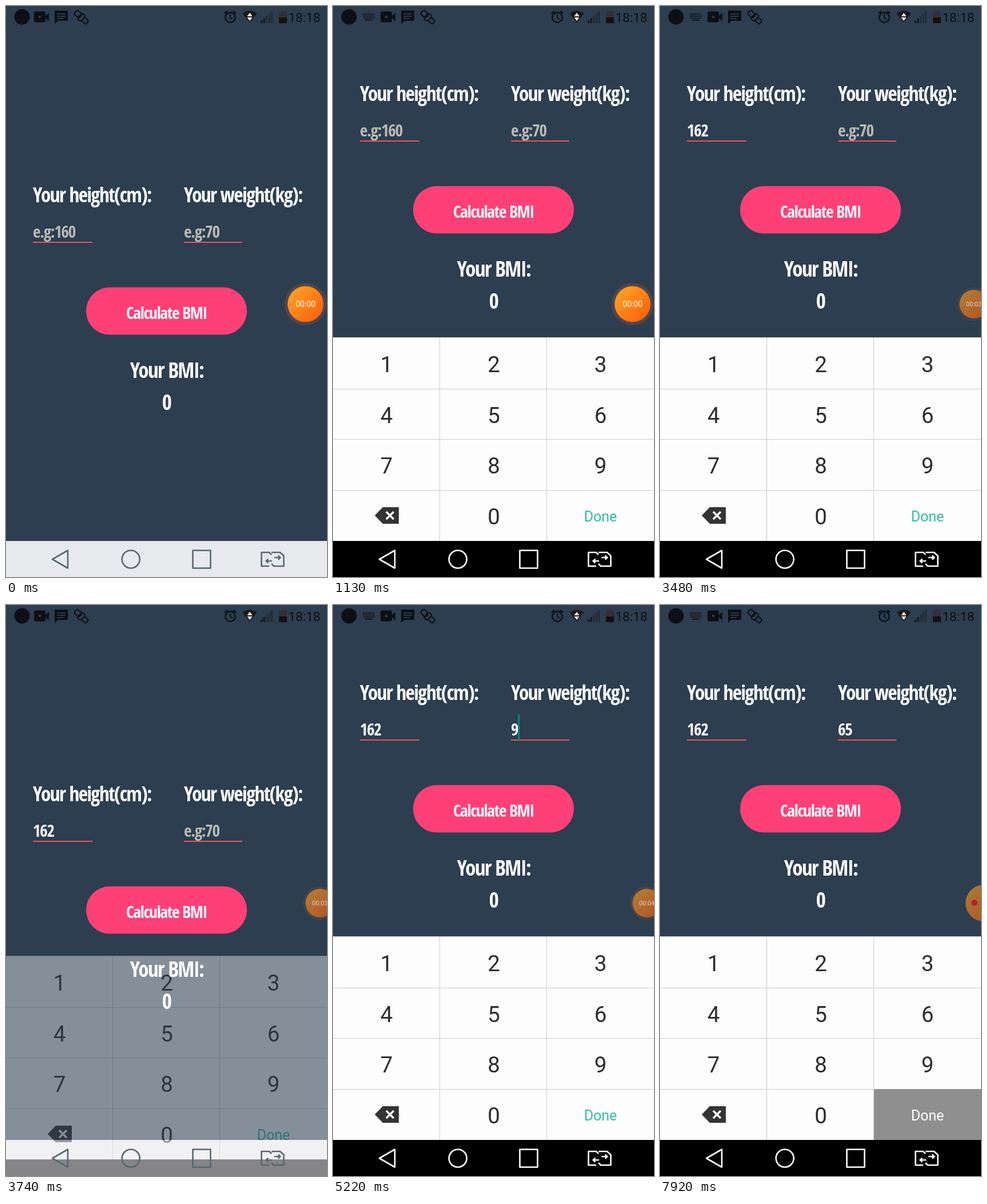
An HTML page with a canvas that plays this animation: 561x998 px, repeating every 8 s.

```html
<!DOCTYPE html>
<html lang="en">
<head>
<meta charset="utf-8">
<title>BMI calculator</title>
<style>
html, body { margin: 0; width: 100%; height: 100%; overflow: hidden; background: #2c3e4f; }
canvas { display: block; width: 561px; height: 998px; }
</style>
</head>
<body>
<canvas id="stage" width="561" height="998"></canvas>
<script>
const W = 561, H = 998, LOOP = 8000;
const screen2d = document.getElementById('stage').getContext('2d');
const layer = document.createElement('canvas');
layer.width = W;
layer.height = H;
const layer2d = layer.getContext('2d');
let ctx = screen2d;

const BG = '#2c3e4f', PINK = '#ff4077', INK = '#0c1015';
const ROBOTO = 'Roboto, "Noto Sans", sans-serif';
const KB_TOP = 579, NAV_TOP = 935, SHIFT = 177;
const ROWS = [579, 669, 757, 846, 935], COLS = [0, 187, 374, 561];
const KEYS = ['1', '2', '3', '4', '5', '6', '7', '8', '9', 'Del', '0', 'Done'];

// timeline: [start, value]
const HEIGHT = [[0, ''], [2090, '1'], [2350, '16'], [2700, '162']];
const WEIGHT = [[0, ''], [5130, '9'], [6000, ''], [6700, '6'], [6960, '65']];
const FOCUS = [[0, ''], [520, 'h'], [3310, ''], [4090, 'w'], [7920, '']];
const CLOCK = [[0, '00:00'], [1390, '00:01'], [2350, '00:02'], [3390, '00:03'], [4530, '00:04'], [5390, '']];
// presses: [start, end, key]
const PRESSES = [[2260, 2350, '6'], [2610, 2700, '2'], [3130, 3310, 'Done'], [4960, 5130, '9'],
  [5920, 6090, 'Del'], [6700, 6790, '6'], [6960, 7050, '5'], [7920, 8000, 'Done']];

const clamp = v => Math.max(0, Math.min(1, v));
const mix = (a, b, u) => a + (b - a) * u;
const entry = (list, t) => list.filter(e => e[0] <= t).pop();
const at = (list, t) => entry(list, t)[1];

function rect(x, y, w, h, color) {
  ctx.fillStyle = color;
  ctx.fillRect(x, y, w, h);
}
function round(x, y, w, h, r, color) {
  ctx.fillStyle = color;
  ctx.beginPath();
  ctx.roundRect(x, y, w, h, r);
  ctx.fill();
}
function disc(x, y, r, color) {
  ctx.fillStyle = color;
  ctx.beginPath();
  ctx.arc(x, y, r, 0, 7);
  ctx.fill();
}
function trace(points, close) {
  ctx.beginPath();
  points.forEach(p => ctx.lineTo(p[0], p[1]));
  if (close) ctx.closePath();
}
function poly(points, color) {
  trace(points, true);
  ctx.fillStyle = color;
  ctx.fill();
}
function line(points, color, width, close) {
  trace(points, close);
  ctx.strokeStyle = color;
  ctx.lineWidth = width;
  ctx.stroke();
}
function text(s, x, y, font, color, align = 'left') {
  ctx.font = font;
  ctx.fillStyle = color;
  ctx.textAlign = align;
  ctx.fillText(s, x, y);
}

// the installed family with the tallest capitals for its width
function slimmest(families) {
  const slimness = name => {
    ctx.font = `400 extra-condensed 100px ${name}, sans-serif`;
    return ctx.measureText('H').actualBoundingBoxAscent / ctx.measureText('Your height(cm):').width;
  };
  return families.reduce((a, b) => slimness(b) > slimness(a) ? b : a);
}
const NARROW = slimmest(['Oswald', '"Open Sans"', 'Roboto', '"Roboto Condensed"', '"Open Sans Condensed"',
  '"Noto Sans"', '"Noto Sans ExtraCondensed"', '"Liberation Sans Narrow"', '"DejaVu Sans Condensed"',
  'Lato', '"Liberation Sans"', '"Noto Sans CJK JP"']);
const TRACKING = -0.045;

// largest font size whose capitals stay within cap and whose sample stays within width
function face(weight, cap, sample, width) {
  const make = size => `${weight} extra-condensed ${size}px ${NARROW}, sans-serif`;
  ctx.font = make(100);
  const perCap = 100 / ctx.measureText('H').actualBoundingBoxAscent;
  const perWidth = 1 / (ctx.measureText(sample).width / 100 + TRACKING * sample.length);
  const size = Math.min(cap * perCap, width * perWidth);
  return { font: make(size), tracking: `${size * TRACKING}px` };
}
function label(s, x, y, style, color, align) {
  ctx.letterSpacing = style.tracking;
  text(s, x, y, style.font, color, align);
  const width = ctx.measureText(s).width;
  ctx.letterSpacing = '0px';
  return width;
}
const LABEL = face(400, 27, 'Your height(cm):', 207);
const INPUT = face(400, 22, 'e.g:160', 74);
const BUTTON = face(400, 22, 'Calculate BMI', 141);
const TITLE = face(700, 27, 'Your BMI:', 134);

function keyboardState(t) {
  const show = s => {
    const u = clamp((t - s) / 260);
    return { lifted: true, dy: Math.round(83 * (1 - u) ** 2), alpha: 0.5 + 0.5 * u };
  };
  if (t >= 4440) return show(4440);
  if (t >= 3570) {
    const u = clamp((t - 3570) / 350);
    return { lifted: false, dy: Math.round(144 * u * u), alpha: Math.max(0, 1 - 1.17 * u) };
  }
  if (t >= 870) return show(870);
  return { lifted: false, dy: 0, alpha: 0 };
}

function field(x, width, list, hint, id, t) {
  const [since, value] = entry(list, t);
  const length = label(value || hint, x, 405, INPUT, value ? '#fff' : '#b9bab6');
  rect(x, 412, width, 2, '#ea5560');
  const [focused, who] = entry(FOCUS, t);
  if (who === id && (t - Math.max(focused, since)) % 1000 < 440)
    rect(x + (value ? length : 0), 368, 3, 45, '#0d857a');
}

function form(t, lifted) {
  ctx.save();
  if (lifted) ctx.translate(0, -SHIFT);
  label('Your height(cm):', 47, 342.5, LABEL, '#fff');
  label('Your weight(kg):', 311, 342.5, LABEL, '#fff');
  field(47, 104, HEIGHT, 'e.g:160', 'h', t);
  field(311, 102, WEIGHT, 'e.g:70', 'w', t);
  round(140, 491.8, 281, 82.7, 41, PINK);
  label('Calculate BMI', 280.5, 547, BUTTON, '#fff', 'center');
  label('Your BMI:', 281, 650, TITLE, '#fff', 'center');
  label('0', 280.5, 706, TITLE, '#fff', 'center');
  ctx.restore();
}

function statusLeft(lifted) {
  disc(28, 19, 13.5, INK);
  ctx.save();
  if (lifted) {
    for (let r = 0; r < 3; r++)
      for (let i = 0; i < 7; i++) rect(52 + i * 3 + r * 0.5, 13 + r * 3.5, 2, 2, INK);
    rect(56, 23.5, 13, 2, INK);
    ctx.translate(34, 0);
  }
  round(49, 9.5, 20, 19, 3, INK);
  poly([[67, 19], [75, 12], [75, 27]], INK);
  disc(59, 19, 2.2, BG);
  poly([[85, 8], [108, 8], [108, 26], [91, 26], [85, 31]], INK);
  [13, 17, 21].forEach((y, i) => rect(89, y, i === 2 ? 11 : 15, 1.8, BG));
  ctx.translate(131, 19);
  ctx.rotate(0.75);
  ctx.strokeStyle = INK;
  ctx.lineWidth = 2;
  ctx.beginPath();
  ctx.roundRect(-13, -4.5, 12, 9, 3);
  ctx.roundRect(-3, -6.5, 8, 13, 3);
  ctx.roundRect(5, -4, 10, 8, 3);
  ctx.stroke();
  ctx.restore();
}

function statusRight() {
  ctx.strokeStyle = INK;
  ctx.lineWidth = 2.4;
  ctx.beginPath();
  ctx.arc(392, 20, 8.8, 0, 7);
  ctx.stroke();
  line([[392, 14], [392, 20.5], [396, 23]], INK, 2);
  line([[382, 13], [387, 9]], INK, 2.5);
  line([[402, 13], [397, 9]], INK, 2.5);

  ctx.fillStyle = '#1d1815';
  ctx.beginPath();
  ctx.moveTo(426, 29);
  ctx.lineTo(413.5, 13);
  ctx.quadraticCurveTo(426, 4, 438.5, 13);
  ctx.fill();
  poly([[426, 12], [430.5, 18], [421.5, 18]], '#fff');
  poly([[426, 26], [430.5, 20], [421.5, 20]], '#fff');

  for (let i = 0; i < 5; i++)
    rect(445 + i * 4.5, 25 - i * 4, 3.2, 5 + i * 4, i < 2 ? '#151a20' : '#242d37');
  rect(481, 8, 6, 3, '#332f36');
  rect(477, 10, 14, 10, '#332f36');
  rect(477, 20, 14, 10, '#15110f');
  text('18:18', 549.5, 28, `400 22.5px ${ROBOTO}`, INK, 'right');
}

function keys(t) {
  const press = PRESSES.find(p => t >= p[0] && t < p[1]);
  rect(0, KB_TOP, W, NAV_TOP - KB_TOP, '#fdfdfd');
  rect(0, NAV_TOP, W, H - NAV_TOP, '#000');
  ROWS.slice(0, 4).forEach(y => rect(0, y, W, 1, '#cbcbd0'));
  COLS.slice(1, 3).forEach(x => rect(x - 1, KB_TOP, 1, NAV_TOP - KB_TOP, '#cacad8'));
  KEYS.forEach((key, i) => {
    const c = i % 3, r = Math.floor(i / 3);
    const x = [93.5, 281, 467.5][c], y = [626, 714.5, 803, 891.5][r];
    const on = press && press[2] === key;
    if (on) rect(COLS[c], ROWS[r], COLS[c + 1] - COLS[c], ROWS[r + 1] - ROWS[r], '#8f8f8f');
    if (key === 'Del') {
      poly([[73, 890.5], [87, 876], [115, 876], [115, 905], [87, 905]], on ? '#fff' : '#343434');
      const ink = on ? '#8f8f8f' : '#fff';
      line([[93, 884], [106, 897]], ink, 3.4);
      line([[106, 884], [93, 897]], ink, 3.4);
    } else if (key === 'Done') {
      text(key, x, y + 9, `400 25px ${ROBOTO}`, on ? '#fff' : '#2fbfa6', 'center');
    } else {
      text(key, x, y + 14, `400 38.5px ${ROBOTO}`, on ? '#fff' : '#2c2c2c', 'center');
    }
  });
}

// the keyboard fades as one layer
function keyboard(t, { dy, alpha }) {
  if (!alpha) return;
  ctx = layer2d;
  keys(t);
  ctx = screen2d;
  ctx.globalAlpha = alpha;
  ctx.drawImage(layer, 0, KB_TOP, W, H - KB_TOP, 0, KB_TOP + dy, W, H - KB_TOP);
  ctx.globalAlpha = 1;
}

function navIcons(color) {
  ctx.lineJoin = 'round';
  line([[81, 967], [108, 951.5], [108, 982.5]], color, 2.6, true);
  ctx.beginPath();
  ctx.arc(218.2, 967, 15.5, 0, 7);
  ctx.stroke();
  ctx.strokeRect(326.5, 951.5, 31, 31);
  line([[460, 979], [446.5, 979], [446.5, 955], [460, 955], [464, 959]], color, 2.6);
  line([[464, 955], [479, 955], [485.5, 961], [485.5, 979], [468, 979], [464, 975]], color, 2.6);
  line([[469, 964], [479, 964]], color, 2.4);
  line([[475.5, 960.5], [479.5, 964], [475.5, 967.5]], color, 2.4);
  line([[465, 970], [455, 970]], color, 2.4);
  line([[458.5, 966.5], [454.5, 970], [458.5, 973.5]], color, 2.4);
  ctx.lineJoin = 'miter';
}

function bubble(t) {
  const u = clamp((t - 1480) / 600), e = u * u * (3 - 2 * u);
  const tucked = t >= 5390;
  const x = tucked ? 566 : mix(523.5, 548.5, e), y = 521;
  const r = tucked ? 32 : mix(31.3, 25, e);
  ctx.save();
  ctx.globalAlpha = mix(1, 0.6, e);
  if (!tucked) disc(x, y, r * 1.18, 'rgba(255,110,60,.17)');
  const g = ctx.createLinearGradient(x - r * 0.7, y - r * 0.7, x + r * 0.7, y + r * 0.7);
  g.addColorStop(0, '#ff9d22');
  g.addColorStop(1, '#ff650c');
  disc(x, y, r, g);
  ctx.restore();
  if (tucked) disc(549.5, 520.5, 5.5, '#b8212f');
  else text(at(CLOCK, t), x, y + r * 0.16, `400 ${r * 0.445}px ${ROBOTO}`, e < 1 ? '#fff' : '#dcd3cb', 'center');
}

function draw(t) {
  const kb = keyboardState(t);
  rect(0, 0, W, H, BG);
  form(t, kb.lifted);
  statusLeft(kb.lifted);
  statusRight();
  if (kb.lifted) rect(0, KB_TOP + 1, W, NAV_TOP - KB_TOP - 1, '#fdfdfd');
  rect(0, NAV_TOP, W, H - NAV_TOP, '#e8e9ec');
  keyboard(t, kb);
  navIcons(kb.alpha > 0.85 ? '#fff' : '#58686f');
  bubble(t);
}

const start = performance.now();
function tick(now) {
  draw(Math.max(0, now - start) % LOOP);
  requestAnimationFrame(tick);
}
draw(0);
requestAnimationFrame(tick);
</script>
</body>
</html>
```
